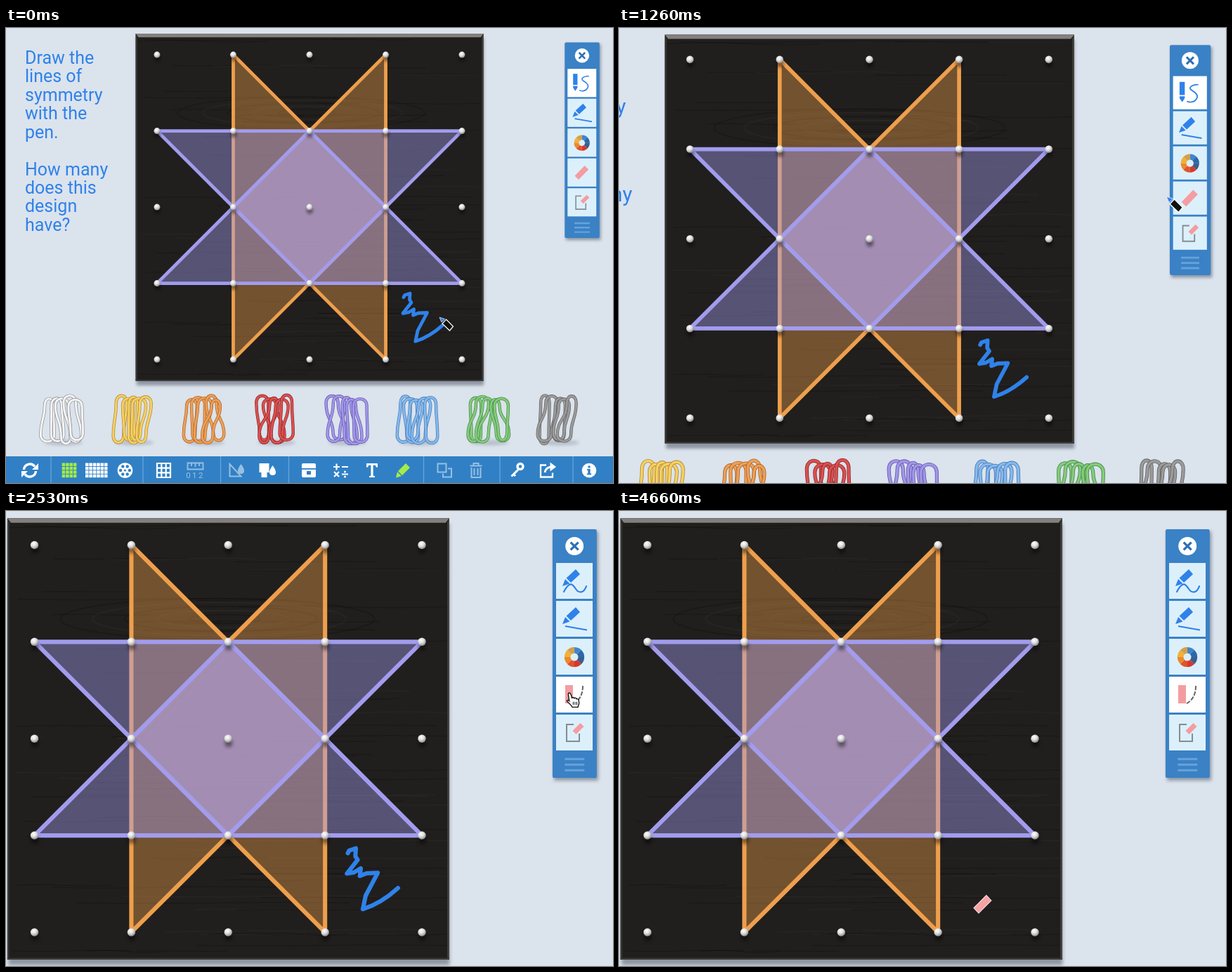
Recreate the animation shown at these times as an HTML page. Size 864 by 648 pixels, loop 6.13 s.

```html
<!DOCTYPE html>
<html lang="en">
<head>
<meta charset="utf-8">
<title>Geoboard: erasing a pen stroke</title>
<style>
html, body { margin: 0; width: 100%; height: 100%; overflow: hidden; background: #dbe3ed; }
svg { display: block; width: 100vw; height: 100vh; }
text { font-family: Roboto, sans-serif; }
</style>
</head>
<body>
<svg id="stage" viewBox="0 0 864 648">
<defs>
  <radialGradient id="pin" cx=".4" cy=".32" r=".7">
    <stop offset="0" stop-color="#fff"/><stop offset=".5" stop-color="#dcdcdc"/><stop offset="1" stop-color="#85858a"/>
  </radialGradient>
  <filter id="blur" x="-50%" y="-50%" width="200%" height="200%"><feGaussianBlur stdDeviation="2"/></filter>
</defs>
<g id="world"></g>
</svg>
<script>
const LOOP = 6130, STEP = 200 / 3;
const BLUE = '#2f82ea', PINK = '#f49da0', BAR = '#3180c5', PURPLE = '#a29cee', ORANGE = '#ee9f4d';
const world = document.getElementById('world');

let seed = 7;
const rnd = () => (seed = seed * 16807 % 2147483647) / 2147483647;
const range = (n, f) => Array.from({ length: n }, (_, i) => f(i)).join('');
const rect = (x, y, w, h, fill, extra = '') =>
  `<rect x="${x}" y="${y}" width="${w}" height="${h}" fill="${fill}" ${extra}/>`;
const dot = (x, y, r, fill, extra = '') => `<circle cx="${x}" cy="${y}" r="${r}" fill="${fill}" ${extra}/>`;
const fillPath = (d, fill, extra = '') => `<path d="${d}" fill="${fill}" ${extra}/>`;
const line = (d, color, w, extra = '') =>
  `<path d="${d}" fill="none" stroke="${color}" stroke-width="${w}" ${extra}/>`;
const ROUND = 'stroke-linecap="round" stroke-linejoin="round"';

function instructions() {
  const rows = ['Draw the', 'lines of', 'symmetry', 'with the', 'pen.', '', 'How many', 'does this', 'design', 'have?'];
  return `<g fill="${BLUE}" font-size="25" font-weight="400">` +
    rows.map((s, i) => `<text x="27" y="${50.8 + i * 26.45}">${s}</text>`).join('') + '</g>';
}

function grain() {
  const rows = range(80, () => {
    const x = 186 + rnd() * 300, y = 16 + rnd() * 480, w = Math.min(80 + rnd() * 260, 677 - x), b = rnd() * 6 - 3;
    return line(`M${x} ${y}q${w / 4} ${b} ${w / 2} 0t${w / 2} 0`, rnd() < .7 ? '#0f0d0c' : '#34302c', 1, 'opacity=".35"');
  });
  const rings = range(5, i =>
    `<ellipse cx="${428 - i * 2}" cy="121" rx="${40 + i * 34}" ry="${5 + i * 4.5}" fill="none" stroke="${i % 2 ? '#38322c' : '#0f0d0c'}" stroke-width="1.6" opacity=".28"/>`);
  return rows + rings;
}

// Pin position by column and row
const GAP = 108.5, X0 = 215, Y0 = 38.1;
const pinAt = (c, r) => [X0 + c * GAP, Y0 + r * GAP];

function board() {
  const tri = (c, o, ...pins) =>
    `<polygon points="${pins.map(p => pinAt(...p)).join(' ')}" fill="${c}" fill-opacity="${o}" stroke="${c}" stroke-width="4.8" stroke-linejoin="round"/>`;
  const pins = range(25, i => {
    const [x, y] = pinAt(i % 5, Math.floor(i / 5));
    return `<ellipse cx="${x + .5}" cy="${y + 5}" rx="4.4" ry="4.6" fill="#000" opacity=".45" filter="url(#blur)"/>` +
      dot(x, y, 4.5, 'url(#pin)');
  });
  return rect(186, 14, 494, 495, '#6d7783', 'opacity=".7" filter="url(#blur)"') +
    rect(184.6, 8, 495, 494.6, '#211f1d') + grain() +
    fillPath('M184.6 8h495l-4 5.2h-487z', '#83807e') +
    fillPath('M184.6 8l2 5v489.6h-2z', '#3b3937') +
    fillPath('M679.6 8l-2 5v489.6h2z', '#47443f') +
    rect(184.6, 501, 495, 1.6, '#3d3b39') +
    tri(ORANGE, .4, [1, 0], [3, 2], [1, 4]) +
    tri(ORANGE, .4, [3, 0], [1, 2], [3, 4]) +
    tri(PURPLE, .42, [0, 1], [4, 1], [2, 3]) +
    tri(PURPLE, .42, [0, 3], [4, 3], [2, 1]) + pins;
}

function bands() {
  const colors = [['#f4f4f4', '#8d9094'], ['#f6d065', '#b28a2c'], ['#ef9f55', '#a9652a'], ['#db5050', '#8f2828'],
    ['#a196ea', '#6458a8'], ['#84b9f1', '#4677ab'], ['#85cb7f', '#438a40'], ['#9b9b9b', '#626262']];
  return colors.map(([c, edge], n) => {
    const loops = range(5, i => {
      const w = 6 + rnd() * 4, v = 6 + rnd() * 4;
      const a = -18 + i * 9 + rnd() * 4 - 2, b = Math.max(-21, Math.min(21, a + rnd() * 28 - 14));
      const top = -25 + rnd() * 7, bot = 25 - rnd() * 6;
      const d = `M${a - w} ${top}C${a - w} ${top - 13} ${a + w} ${top - 13} ${a + w} ${top}` +
        `C${a + w} 0 ${b + v} 0 ${b + v} ${bot}C${b + v} ${bot + 13} ${b - v} ${bot + 13} ${b - v} ${bot}` +
        `C${b - v} 0 ${a - w} 0 ${a - w} ${top}Z`;
      return line(d, edge, 4.4) + line(d, c, 3);
    });
    return `<g transform="translate(${80 + n * 101} 557.5)">` +
      '<ellipse cx="2" cy="33" rx="27" ry="4" fill="#76808c" opacity=".35" filter="url(#blur)"/>' + loops + '</g>';
  }).join('');
}

function toolbar() {
  const W = '#fff';
  const cells = (x, y, cols, c) => range(cols * 4, i =>
    rect(x + i % cols * 5.4, y + Math.floor(i / cols) * 5.4, 4.5, 4.5, c));
  const drop = (x, y) => fillPath(`M${x} ${y - 7}C${x + 7} ${y + 2} ${x + 5} ${y + 7} ${x} ${y + 7}S${x - 7} ${y + 2} ${x} ${y - 7}`, W);
  const dim = s => `<g opacity=".5">${s}</g>`;
  return rect(-2, 610, 868, 42, BAR) +
    [64, 195, 305.5, 402.5, 594.5, 703, 807].map(x => rect(x - .6, 610, 1.2, 40, '#6aa6dc')).join('') +
    // refresh
    line('M25.5 629a8.6 8.6 0 0 1 15.5-4.5M42.5 631a8.6 8.6 0 0 1-15.5 4.5', W, 3.4) +
    fillPath('M46 620v9h-9zM22 640v-9h9z', W) +
    // pin layouts
    cells(79.7, 619.5, 4, '#a4ec45') + cells(113, 619.5, 6, W) + dot(169.5, 630, 10.8, W) +
    range(6, i => dot(169.5 + 6.4 * Math.cos(i * Math.PI / 3), 630 + 6.4 * Math.sin(i * Math.PI / 3), 2.2, BAR)) + dot(169.5, 630, 1.6, BAR) +
    // grid and number line
    line('M215 620h19v20h-19zM221.3 620v20M227.7 620v20M215 626.7h19M215 633.3h19', W, 2.2) +
    dim(line('M258.5 619.5h22v9h-22zM264 619v5M269.5 619v6M275 619v5', W, 1.8) +
      `<text x="269.5" y="641" font-size="11.5" text-anchor="middle" letter-spacing="2.4" fill="#fff">012</text>`) +
    // shape fills
    dim(line('M318.5 621v17.5h16z', W, 2) + drop(334.5, 628)) +
    fillPath('M360.5 620h14v13h-3v7h-8v-7h-3z', W) + drop(379.5, 630) +
    // workspace
    rect(421, 620, 20, 20, W, 'rx="2"') + rect(421, 627, 20, 1.8, BAR) + rect(428, 631, 6, 5, BAR) +
    line('M466 625h9M470.5 620.5v9M478 625h9M467 632l7 7M474 632l-7 7M478 635.5h9', W, 2.2) +
    dot(482.5, 632, 1.5, W) + dot(482.5, 639, 1.5, W) +
    fillPath('M513 620h16v5.5h-2.2l-.8-2.8h-3.4v14.8l2.4.8v1.7h-8v-1.7l2.4-.8v-14.8H516l-.8 2.8H513z', W) +
    fillPath('M569 620l6 6-11 11-6-6zM557 632l6 6-8 2.5z', '#a4ec45') +
    // edit
    dim(line('M614.5 620.5h12v12h-12zM629 627.5h5v12h-12v-5', W, 2)) +
    dim(line('M660.5 623.5h17M665.5 623v-3h7v3M662.5 626v14h13v-14M666.5 627v10M671.5 627v10', W, 2)) +
    line('M729 629l-9.5 9.5M722 635l3 3', W, 3) + line('M728 624.5a4 4 0 1 1 8 0a4 4 0 1 1-8 0', W, 3.4) +
    line('M769 622.5h-8v17h17v-6', W, 2.3) + line('M767 633q1-7 9-8', W, 2.8) + fillPath('M774.5 618.5l8.5 6.5-8.5 6.5z', W) +
    dot(830, 630, 10.3, W) + fillPath('M827 628h4.7v6.5h1.5v1.8h-6.4v-1.8h1.5v-4.7H827z', BAR) + dot(830, 625, 1.8, BAR);
}

function panel() {
  const tile = (i, icon) => `<g transform="translate(799.3 ${58.2 + i * 42.5}) scale(.787)">` +
    rect(0, 0, 52, 51, '#dcf0fb', `id="tile${i}"`) + icon + '</g>';
  const pen = fillPath('M28 9l6 7-13 12-6.5-6.5zM13 23l6.5 6.5L9 33z', BLUE);
  const eraser = fillPath('M31 13l7 7-18 18.5-7-7z', PINK);
  const hues = ['#3f86cf', '#2c68a8', '#3c5d90', '#d33a2e', '#e0542b', '#ea8a2d', '#f2b03c', '#d3a04a'];
  const wheel = hues.map((c, i) => `<g transform="rotate(${i * 45} 26 26)">` +
    line('M26 16.2a9.8 9.8 0 0 1 7.1 2.9', c, 8.6) + '</g>').join('');
  const penOn = fillPath('M10 9h8v20h-8zM10 31h8v3l-4 6-4-6z', BLUE) +
    line('M38 13C29 13 22 18 29 22C36 26 39 30 36 35C33 40 27 41 22 39', BLUE, 2, ROUND);
  const penOff = pen + line('M11 41C20 24 24 31 28 37S39 44 43 33', BLUE, 2.2, ROUND);
  const eraseOn = rect(13, 12, 11, 26, PINK) + line('M38 13Q38 31 25 38', '#666', 2, 'stroke-dasharray="6 2"');
  return rect(797, 23, 49.5, 279, '#53606e', 'opacity=".6" filter="url(#blur)"') +
    rect(795.3, 20.5, 49.5, 278.5, '#3a81c5', 'rx="2"') +
    dot(819.9, 39.3, 10.2, '#fff') + line('M815.6 35l8.6 8.6M824.2 35l-8.6 8.6', '#2d6fb4', 2.5) +
    tile(0, `<g id="penOn">${penOn}</g><g id="penOff">${penOff}</g>`) +
    tile(1, pen + line('M13 36l31 5.5', BLUE, 2.2)) +
    tile(2, wheel) +
    tile(3, `<g id="eraseOff">${eraser}</g><g id="eraseOn">${eraseOn}</g>`) +
    tile(4, line('M25 14H15v24h18V27', '#858b90', 2) + fillPath('M34.5 12l5 5-11 11-5-5z', PINK)) +
    line('M809 278h22M809 284.3h22M809 290.6h22', '#67a2da', 2.4);
}

const scribble = line('M566 383.5L567.5 380.5L575 378L574.5 387L577 391L565 406.3L573 405L580.5 400.5L579.5 409L587 406L599.5 405.5L586 431L582.8 446.2Q603 440 622.2 422.6',
  BLUE, 4.8, `id="ink" pathLength="100" ${ROUND}`);

const cursors = `<g id="penCur">${fillPath('M9.5 3L19.5 13L14.5 19L4 9z', '#111', 'stroke="#fff" stroke-width="1.2"')}${fillPath('M0 0L7.6 2.4L3 7z', BLUE, 'stroke="#e8f2ff" stroke-width=".7"')}</g>
<g id="handCur">${fillPath('M3 0C4 0 4.6 1 5 2L6 5.6C7 4.8 8.2 5 8.6 6C9.6 5.2 10.8 5.6 11 6.8C12.2 6.2 13.4 7 13.6 8.4L14 11C14 13 13 14 12.8 16H6.4C5.6 14 3 11.6 .6 9.6C-.2 8.6 1.4 7.6 3 9L2 2C1.8 .8 2.2 0 3 0Z', '#fff', 'stroke="#111" stroke-width="1.1"')}${line('M7.5 10v3.4M9.5 10v3.4M11.5 10v3.4', '#111', .8)}</g>
<g id="rubCur">${fillPath('M4.3 -10L9.8 -4.2L-4.3 10L-9.8 4.2z', '#f7a2a5', 'stroke="#fde3e3" stroke-width=".8"')}</g>`;

world.innerHTML = instructions() + bands() + board() + scribble + toolbar() + panel() + `<g id="cursor">${cursors}</g>`;

const el = id => document.getElementById(id);
const show = (id, on) => el(id).setAttribute('display', on ? 'inline' : 'none');

// Keys are [time, value, ...]
const move = [[800, 617, 412], [867, 617, 412], [1000, 695, 285], [1267, 791.5, 204], [1533, 809.5, 202.5], [1800, 811, 203.8],
  [2533.4, 811, 203.8], [3133, 565.5, 372.2], [3267, 564, 393.5], [3400, 580.5, 397.4], [3533, 596.2, 409.2],
  [3633, 589.9, 427.3], [3733, 599, 405.3], [3800, 600.2, 407.7], [3933, 593.1, 433.6], [4067, 621.4, 419.5],
  [4200, 621.4, 419.5], [4667, 590.3, 440.7]];
const inkStart = [[3133, 0], [3267, 20], [3400, 37], [3533, 50], [3667, 65.3], [3800, 65.3], [3933, 72]];
const inkEnd = [[4000, 100], [4067, 96], [4200, 96], [4600, 72]];

function at(keys, t) {
  const i = keys.findIndex(k => k[0] > t);
  if (i === 0) return keys[0].slice(1);
  if (i < 0) return keys[keys.length - 1].slice(1);
  const a = keys[i - 1], b = keys[i], p = (t - a[0]) / (b[0] - a[0]);
  return a.slice(1).map((v, n) => v + (b[n + 1] - v) * p);
}

function draw(ms) {
  const t = Math.floor((ms + 7) / STEP) * STEP;
  const p = Math.min(1, Math.max(0, (t - 918) / 582));
  const z = .2707 * Math.sin(p * Math.PI / 2) ** 2;
  world.setAttribute('transform', `translate(${-859.5 * z} ${.2 * z}) scale(${1 + z})`);

  const [x, y] = at(move, t), erasing = t >= 1999, over = x > 797;
  el('cursor').setAttribute('transform', `translate(${x} ${y})`);
  show('handCur', over);
  show('penCur', !over && !erasing);
  show('rubCur', !over && erasing);

  show('penOn', !erasing);
  show('penOff', erasing);
  show('eraseOn', erasing);
  show('eraseOff', !erasing);
  el('tile0').setAttribute('fill', erasing ? '#dcf0fb' : '#fff');
  el('tile3').setAttribute('fill', erasing ? '#fff' : '#dcf0fb');

  const [a] = at(inkStart, t), [b] = at(inkEnd, t);
  show('ink', b - a > .1);
  el('ink').setAttribute('stroke-dasharray', `${b - a} 300`);
  el('ink').setAttribute('stroke-dashoffset', -a);
}

const begin = performance.now();
function tick() {
  draw((performance.now() - begin) % LOOP);
  requestAnimationFrame(tick);
}
tick();
</script>
</body>
</html>
```
